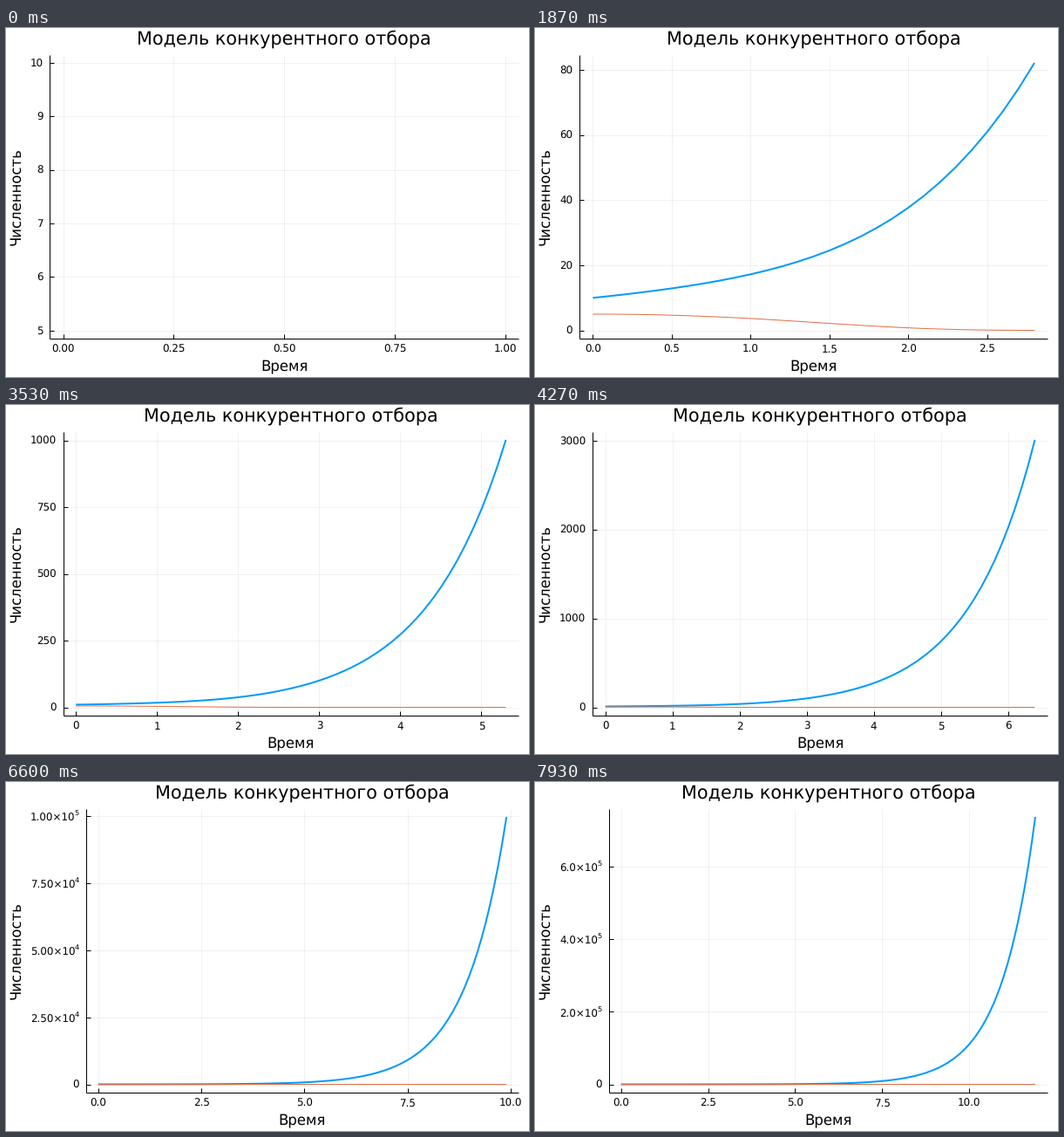
Write a matplotlib script that moves like this. It is 600 px wide and 400 px high and loops after 8 s.

```python
import math

import matplotlib.pyplot as plt
import numpy as np
from matplotlib.animation import FuncAnimation
from matplotlib.textpath import TextPath

W, H, DPI = 600, 400, 100
TICK_MS, LOOP = 20, 8000           # the curves grow 3 steps in every 10 ticks
PT = 72 / DPI                      # points per pixel
RIGHT, TOP, BOTTOM = 588.2, 30.8, 355.7
TITLE_PX, GUIDE_PX, TICK_PX = 20.78, 16.5, 11.87
SUP_PX = TICK_PX * 0.7
SUP_WIDTH = 0.55 * SUP_PX
BLUE, ORANGE = "#009afa", "#e26f46"
STEPS = [(1, 1), (5, 0.9), (2, 0.7), (2.5, 0.5), (3, 0.2)]

plt.rcParams["font.family"] = "DejaVu Sans"
plt.rcParams["text.hinting"] = "none"
plt.rcParams["text.hinting_factor"] = 8

fig = plt.figure(figsize=(W / DPI, H / DPI), dpi=DPI, facecolor="white")
ax = fig.add_axes([0, 0, 1, 1])
ax.axis("off")


def populations(t):
    """Solve x' = x - xy/10, y' = y - xy/10 with x(0) = 10, y(0) = 5."""
    decay = np.exp(-0.5 * np.expm1(t))
    weak = 5 * np.exp(t) * decay / (2 - decay)
    return weak + 5 * np.exp(t), weak


def widen(lo, hi):
    if lo == hi:
        hi = lo + 1
    pad = 0.03 * (hi - lo)
    return lo - pad, hi + pad


def find_ticks(lo, hi, k_min=4, k_max=8, ideal=5):
    """Pick the tick set with the best mix of count, coverage and roundness."""
    span = hi - lo
    z = math.ceil(math.log10(span))
    best, best_score = [], -math.inf
    while 2 * k_max * 10.0 ** (z + 1) > span:
        for k in range(k_min, 2 * k_max + 1):
            for q, nice in STEPS:
                step = q * 10.0 ** z
                width = (k - 1) * step
                first = math.ceil((hi - width) / step)
                for r in range(first, math.floor(lo / step) + 1):
                    marks = [i for i in range(r, r + k) if lo <= i * step <= hi]
                    n = len(marks)
                    if not k_min <= n <= k_max:
                        continue
                    score = (1 - abs(n - ideal) / ideal) / 4 + nice / 4
                    score += (r <= 0 and -r < k) / 6
                    score += 0.5 * span / ((n - 1) * step)
                    score -= 10000 * (width > span) + 1000 * (width >= 2 * span)
                    if score > best_score + 1e-9:
                        best_score = score
                        best = [round(i * step, 9) for i in marks]
        z -= 1
    return best


def decimals(values):
    return next(d for d in range(10)
                if all(abs(v - round(v, d)) < 1e-8 for v in values))


def tick_labels(ticks):
    """Return (text, exponent) pairs; the exponent is empty for plain numbers."""
    if abs(math.log10(ticks[-1] - ticks[0])) <= 4 + 1e-9:
        d = decimals(ticks)
        return [(f"{v:.{d}f}", "") for v in ticks]
    powers = [math.floor(math.log10(v) + 1e-9) if v else 0 for v in ticks]
    heads = [v / 10 ** p for v, p in zip(ticks, powers)]
    d = decimals(heads) + 1
    return [(f"{h:.{d}f}×10", str(p)) if h else ("0", "")
            for h, p in zip(heads, powers)]


def label_width(label):
    text, power = label
    ink = TextPath((0, 0), text, size=TICK_PX).get_extents().width
    return ink + (SUP_WIDTH if power else 0)


def write(x, y, text, px, ha="center", **kw):
    ax.text(x, y, text, fontsize=px * PT, ha=ha, va="baseline", color="black", **kw)


def stroke(x, y, color="black", px=1.0, **kw):
    ax.plot(x, y, color=color, lw=px * PT, solid_capstyle="butt",
            solid_joinstyle="round", **kw)


def draw_chart(step):
    ax.clear()
    ax.axis("off")
    ax.set_xlim(0, W)
    ax.set_ylim(H, 0)

    t = np.arange(step + 1) / 10
    strong, weak = populations(t)
    x0, x1 = widen(t[0], t[-1])
    y0, y1 = widen(min(weak.min(), strong.min()), max(weak.max(), strong.max()))
    x_ticks, y_ticks = find_ticks(x0, x1), find_ticks(y0, y1)
    x_names, y_names = tick_labels(x_ticks), tick_labels(y_ticks)
    left = 37.4 + max(map(label_width, y_names))

    def px(v):
        return left + (v - x0) / (x1 - x0) * (RIGHT - left)

    def py(v):
        return BOTTOM - (v - y0) / (y1 - y0) * (BOTTOM - TOP)

    for v in x_ticks:
        stroke([px(v)] * 2, [TOP, BOTTOM], alpha=0.055)
    for v in y_ticks:
        stroke([left, RIGHT], [py(v)] * 2, alpha=0.055)

    stroke([left, RIGHT], [BOTTOM] * 2)
    stroke([left] * 2, [TOP, BOTTOM])
    for v, (text, _) in zip(x_ticks, x_names):
        stroke([px(v)] * 2, [BOTTOM, BOTTOM - 5])
        write(px(v), 371.6, text, TICK_PX)
    for v, (text, power) in zip(y_ticks, y_names):
        y, edge = py(v), left - 8
        stroke([left, left + 5], [y] * 2)
        if power:
            write(edge - SUP_WIDTH, y + 6.2, text, TICK_PX, "right")
            write(edge, y - 0.8, power, SUP_PX, "right")
        else:
            write(edge, y + 4.4, text, TICK_PX, "right")

    if step:
        stroke(px(t), py(strong), BLUE, 2)
        stroke(px(t), py(weak), ORANGE, 1)

    middle = (left + RIGHT) / 2
    write(middle, 18.5, "Модель конкурентного отбора", TITLE_PX)
    write(middle, 392.2, "Время", GUIDE_PX)
    write(16.2, (TOP + BOTTOM) / 2, "Численность", GUIDE_PX,
          rotation=90, rotation_mode="anchor")


shown = {"step": None}


def draw(tick):
    step = (3 * tick + 2) // 10
    if shown["step"] != step:      # redraw only when the chart changes
        draw_chart(step)
        shown["step"] = step
    return []


def reset():
    shown["step"] = None
    return []


anim = FuncAnimation(fig, draw, frames=LOOP // TICK_MS, init_func=reset,
                     interval=TICK_MS, repeat=True, repeat_delay=0)
plt.show()
```
